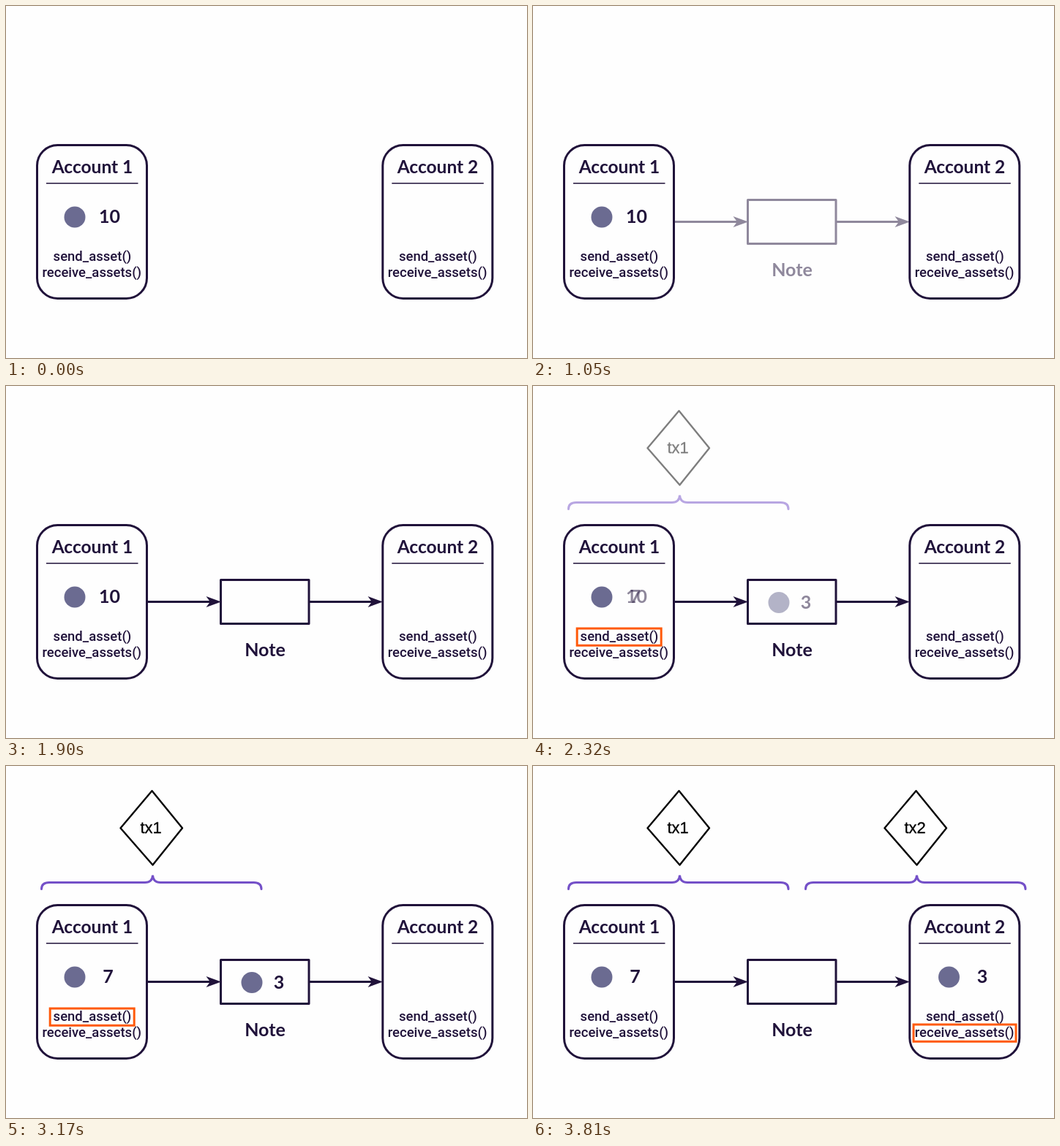
Write an HTML page that moves like this. It is 712 px wide and 482 px high and loops after 4.86 s.

```html
<!DOCTYPE html>
<html lang="en">
<head>
<meta charset="utf-8">
<title>Asset transfer</title>
<style>
  html, body { margin: 0; width: 100%; height: 100%; overflow: hidden; background: #fefefe; }
  svg { display: block; }
  text { fill: #20123a; text-anchor: middle; }
  .head { font: 700 25px Lato, sans-serif; }
  .title { font-size: 24.5px; }
  .code { font: 500 18.5px Roboto, sans-serif; }
  .tx { font: 22px "Liberation Sans", Arial, sans-serif; fill: #000; stroke: #000; stroke-width: .3; text-anchor: start; }
  .line { fill: none; stroke: #20123a; stroke-width: 3; stroke-linejoin: round; }
  .tip { fill: #20123a; }
  .coin { fill: #6b6b91; }
  .mark { fill: none; stroke: #ff5a0a; stroke-width: 3; }
  .brace { fill: none; stroke: #7450c8; stroke-width: 3; stroke-linecap: round; }
  .diamond { fill: none; stroke: #000; stroke-width: 2.4; stroke-linejoin: round; }
</style>
</head>
<body>
<svg width="712" height="482" viewBox="0 0 712 482">
  <defs>
    <g id="account">
      <rect class="line" x="42.5" y="190.5" width="150" height="210" rx="28"/>
      <path class="line" d="M55 242.7H180.5" style="stroke-width:1.5"/>
      <text class="code" x="118" y="349">send_asset()</text>
      <text class="code" x="117.3" y="371">receive_assets()</text>
    </g>
    <g id="arrow">
      <path class="line" d="M194 295.5H282"/>
      <path class="tip" d="M294 295.5L273.5 288L279 295.5L273.5 303Z"/>
    </g>
    <g id="bracket">
      <path class="diamond" d="M199.5 34L241 85L200.5 135.5L156.5 85Z"/>
      <path class="brace" d="M48.5 168.5Q48.5 159.5 59 159.5H190Q200 159.5 200.5 149.5Q201 159.5 211 159.5H338.5Q349 159.5 349 168.5"/>
    </g>
    <circle id="coin" class="coin" r="14.5"/>
  </defs>

  <use href="#account"/>
  <use href="#account" x="472.3"/>
  <text class="head title" x="118" y="229">Account 1</text>
  <text class="head title" x="590" y="229">Account 2</text>
  <use href="#coin" x="94" y="289"/>

  <!-- data-a: opacity in each step -->
  <text class="head" x="141.5" y="297" data-a="1 1 1 .5 0 0 0">10</text>
  <text class="head" x="139.5" y="297" data-a="0 0 0 .5 1 1 1">7</text>

  <g data-a="0 .5 1 1 1 1 1">
    <use href="#arrow"/>
    <use href="#arrow" x="221"/>
    <rect class="line" x="293.5" y="265.5" width="120.5" height="60"/>
    <text class="head" x="354" y="370">Note</text>
  </g>

  <g data-a="0 0 0 .5 1 .5 0">
    <use href="#coin" x="336" y="296.5"/>
    <text class="head" x="373" y="304.5">3</text>
  </g>

  <g data-a="0 0 0 .5 1 1 1">
    <use href="#bracket"/>
    <text class="tx" x="183.5" y="92">tx1</text>
  </g>

  <g data-a="0 0 0 0 0 .5 1">
    <use href="#bracket" x="324"/>
    <text class="tx" x="507.5" y="92">tx2</text>
    <use href="#coin" x="568.5" y="289"/>
    <text class="head" x="614" y="297">3</text>
  </g>

  <rect class="mark" x="60.2" y="332" width="115" height="23.3" data-a="0 0 0 1 1 0 0"/>
  <rect class="mark" x="520" y="354" width="140" height="23.3" data-a="0 0 0 0 0 1 1"/>
</svg>
<script>
  const ends = [1050, 1270, 2320, 2540, 3590, 3810, 4860];
  const parts = [...document.querySelectorAll('[data-a]')]
    .map(el => ({ el, alpha: el.dataset.a.split(' ') }));
  let start;

  function draw(now) {
    start ??= now;
    const t = (now - start) % 4860;
    const step = ends.findIndex(end => t < end);
    for (const { el, alpha } of parts) el.style.opacity = alpha[step];
    requestAnimationFrame(draw);
  }
  requestAnimationFrame(draw);
</script>
</body>
</html>
```
